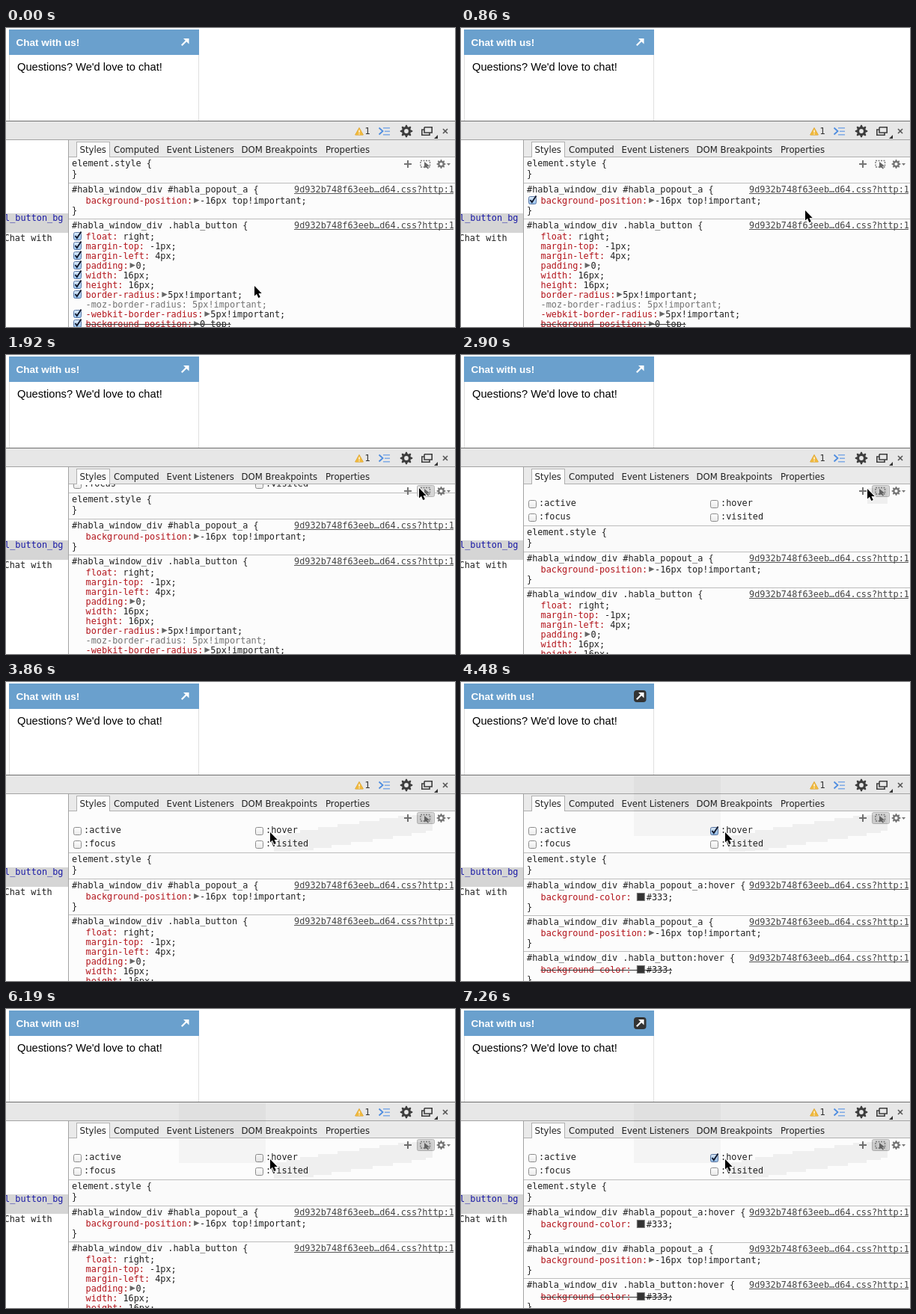
Recreate the animation shown at these times as an HTML page with a canvas. Size 600 by 400 pixels, loop 8 s.

```html
<!DOCTYPE html>
<html lang="en">
<head>
<meta charset="utf-8">
<title>Forcing the hover state</title>
<style>
html, body { margin: 0; width: 100%; height: 100%; overflow: hidden; background: #fff; }
canvas { display: block; width: 600px; height: 400px; }
</style>
</head>
<body>
<canvas id="stage" width="600" height="400"></canvas>
<script>
const ctx = document.getElementById('stage').getContext('2d');
const LOOP = 8000;
const MONO = '11.85px "DejaVu Sans Mono", Menlo, monospace';
const UI = '11.7px "DejaVu Sans", "Lucida Grande", sans-serif';
const SANS = '"Liberation Sans", Helvetica, Arial, sans-serif';
const INK = '#222', RED = '#b3151c', GREY = '#727272';
const FILE = '9d932b748f63eeb…d64.css?http:1';
const PANE_X = 84, PANE_Y = 173;

// Pointer moves: first step, last step, step count, target x, target y
const START = [332, 345];
const MOVES = [
  [500, 1220, 9, 533, 187],
  [1310, 1660, 5, 552, 178],
  [2900, 3690, 10, 358, 207],
  [3780, 3860, 2, 353, 201]
];

const ease = x => { x = x ** 0.89; return x * x * (3 - 2 * x); };

function stepsDone(t, [from, to, n]) {
  if (t < from) return 0;
  return Math.min(n, Math.floor((t - from + 1) / ((to - from) / (n - 1))) + 1);
}

function lerpMove(a, move, k) {
  const p = ease(k / move[2]);
  return [Math.round(a[0] + (move[3] - a[0]) * p), Math.round(a[1] + (move[4] - a[1]) * p)];
}

function pointerAt(t) {
  let pos = START;
  for (const m of MOVES) pos = lerpMove(pos, m, stepsDone(t, m));
  return pos;
}

function rect(x, y, w, h, color) {
  ctx.fillStyle = color;
  ctx.fillRect(x, y, w, h);
}

function text(str, x, y, color = INK, font = MONO, align = 'left') {
  ctx.font = font;
  ctx.textAlign = align;
  ctx.fillStyle = color;
  ctx.fillText(str, x, y);
  return ctx.measureText(str).width;
}

function shape(points, fill, stroke, width = 1, closed = true) {
  ctx.beginPath();
  points.forEach(([x, y]) => ctx.lineTo(x, y));
  if (closed) ctx.closePath();
  if (stroke) {
    ctx.strokeStyle = stroke;
    ctx.lineWidth = width;
    ctx.stroke();
  }
  if (fill) {
    ctx.fillStyle = fill;
    ctx.fill();
  }
}

const line = (points, color, width) => shape(points, null, color, width, false);

function box(x, y, w, h, r, fill, stroke) {
  ctx.beginPath();
  ctx.roundRect(x, y, w, h, r);
  ctx.fillStyle = fill;
  ctx.fill();
  if (stroke) {
    ctx.strokeStyle = stroke;
    ctx.lineWidth = 1;
    ctx.stroke();
  }
}

function gear(x, y, r, color, hole) {
  ctx.beginPath();
  for (let i = 0; i < 32; i++) {
    const a = (i - 0.5) * Math.PI / 16;
    const d = i % 4 < 2 ? r : r * 0.73;
    ctx.lineTo(x + Math.cos(a) * d, y + Math.sin(a) * d);
  }
  ctx.closePath();
  ctx.fillStyle = color;
  ctx.fill();
  ctx.beginPath();
  ctx.arc(x, y, r * 0.35, 0, 7);
  ctx.fillStyle = hole;
  ctx.fill();
}

function checkbox(x, y, on) {
  const g = ctx.createLinearGradient(0, y, 0, y + 11);
  g.addColorStop(0, on ? '#e3effb' : '#fff');
  g.addColorStop(1, on ? '#8fbdec' : '#e8e8e8');
  box(x + 0.5, y + 0.5, 10, 10, 2, g, on ? '#5b78a6' : '#8c8c8c');
  if (on) line([[x + 2.5, y + 5], [x + 4.8, y + 8], [x + 10.5, y - 0.5]], '#10182c', 1.9);
}

function drawPage(hover) {
  rect(0, 0, 600, 124, '#fff');
  rect(4, 36, 1, 88, '#e0e0e0');
  rect(257, 36, 1, 88, '#e0e0e0');
  rect(4, 2, 254, 34, '#6aa0cd');
  text('Chat with us!', 13.5, 24, '#fff', 'bold 13.5px ' + SANS);
  text("Questions? We'd love to chat!", 15, 57, '#000', '14.65px ' + SANS);
  if (hover) box(231, 11, 16.5, 16, 4, '#333');
  line([[234.8, 23.2], [242, 16]], '#fff', 2.2);
  shape([[237, 14], [244.5, 14], [244.5, 21.5]], '#fff');
}

function drawToolbar() {
  rect(0, 124, 600, 26, '#e7e7e7');
  rect(0, 124, 600, 1, '#6f6f6f');
  rect(0, 149, 600, 1, '#a3a3a3');

  shape([[472, 133.5], [477.3, 143], [466.7, 143]], '#f0b93c', '#d69a28');
  rect(471.4, 136.5, 1.3, 3.5, '#fff');
  rect(471.4, 141, 1.3, 1.3, '#fff');
  text('1', 479.5, 142, '#333', UI);

  line([[498.5, 133.5], [503.5, 138], [498.5, 142.5]], '#4e8de0', 1.8);
  rect(504, 133, 9, 1.5, '#7eaae6');
  rect(506, 137.5, 7, 1.5, '#7eaae6');
  rect(504, 142, 9, 1.5, '#7eaae6');

  gear(535, 138, 8.3, '#3d3d3d', '#e7e7e7');

  line([[559, 136], [555.8, 136], [555.8, 143.2], [566, 143.2], [566, 140]], '#3d3d3d', 1.6);
  line([[559, 132.8], [569.2, 132.8], [569.2, 140], [559, 140], [559, 132.8]], '#3d3d3d', 1.6);
  shape([[577, 143], [577, 148], [572, 148]], '#333');
  line([[584, 135], [590, 141]], '#555', 1.6);
  line([[590, 135], [584, 141]], '#555', 1.6);
}

function drawTabs() {
  rect(PANE_X, 150, 516, 23, '#eaeaea');
  rect(PANE_X, 172, 516, 1, '#b0b0b0');
  rect(94, 152, 45, 21, '#b0b0b0');
  rect(95, 153, 43, 20, '#fcfcfc');
  [['Styles', 98.5], ['Computed', 144], ['Event Listeners', 214.5],
   ['DOM Breakpoints', 314.5], ['Properties', 427]]
    .forEach(([name, x]) => text(name, x, 167, '#222', UI));
}

function drawTree() {
  rect(0, 150, 83, 250, '#fff');
  rect(0, 248, 83, 26, '#d5d5d5');
  text('l_button_bg', -2, 258, '#1a1aa6');
  text('Chat with', -2.5, 285);
  rect(83, 150, 1, 250, '#a3a3a3');
}

// One declaration; flags: a arrow, s swatch, x struck out, i ignored
function drawProp([name, value, flags = ''], y, checked) {
  const off = flags.includes('i');
  let x = 106.5;
  x += text(name + ':', x, y, off ? GREY : RED);
  if (flags.includes('a')) {
    shape([[x + 2, y - 8], [x + 9.3, y - 4.4], [x + 2, y - 0.8]], '#666');
    x += 10;
  } else {
    x += 7.1;
  }
  if (flags.includes('s')) {
    rect(x, y - 10, 11, 11, '#777');
    rect(x + 1, y - 9, 9, 9, '#333');
    x += 13;
  }
  x += text(value + ';', x, y, off ? GREY : INK);
  if (flags.includes('x')) rect(106.5, y - 4, x - 108, 1, '#333');
  if (checked && !off) checkbox(90, y - 10, true);
}

function drawRule(top, selector, props, checked) {
  const extra = (props[0][2] || '').includes('s') ? 1 : 0;
  rect(PANE_X, top, 516, 1, '#bdbdbd');
  text(selector + ' {', 88, top + 13);
  text(FILE, 599, top + 13, '#444', MONO, 'right');
  rect(385, top + 14, 213, 1, '#555');
  let y = top + 28 + extra;
  for (const p of props) {
    drawProp(p, y, checked);
    y += 13;
  }
  text('}', 88, y);
  return y + 7;
}

const HOVER = [['background-color', '#333', 's']];
const HOVER_STRUCK = [['background-color', '#333', 'sx']];
const POPOUT = [['background-position', '-16px top!important', 'a']];
const BUTTON = [
  ['float', 'right'],
  ['margin-top', '-1px'],
  ['margin-left', '4px'],
  ['padding', '0', 'a'],
  ['width', '16px'],
  ['height', '16px'],
  ['border-radius', '5px!important', 'a'],
  ['-moz-border-radius', '5px!important', 'i'],
  ['-webkit-border-radius', '5px!important', 'a'],
  ['background-position', '0 top', 'ax']
];

function drawStyles(shift, hover, rules, py) {
  ctx.save();
  ctx.beginPath();
  ctx.rect(PANE_X, PANE_Y, 516, 227);
  ctx.clip();
  rect(PANE_X, PANE_Y, 516, 227, '#fcfcfc');

  if (shift) {
    const dy = shift - 56;
    [['active', 90, 0], ['focus', 90, 18], ['hover', 333, 0], ['visited', 333, 18]]
      .forEach(([name, x, row]) => {
        checkbox(x, 194 + row + dy, name === 'hover' && hover);
        text(':' + name, x + 14, 202 + row + dy);
      });
    rect(PANE_X, 228 + dy, 516, 1, '#bdbdbd');
  }

  rect(PANE_X, PANE_Y + shift, 516, 34, '#fafafa');
  text('element.style {', 88, 185 + shift);
  text('}', 88, 199 + shift);

  let y = 207 + shift;
  if (rules) y = drawRule(y, '#habla_window_div #habla_popout_a:hover', HOVER);
  y = drawRule(y, '#habla_window_div #habla_popout_a', POPOUT, !shift && py > 207 && py < 255);
  if (rules) y = drawRule(y, '#habla_window_div .habla_button:hover', HOVER_STRUCK);
  drawRule(y, '#habla_window_div .habla_button', BUTTON, !shift && py >= 255);
  ctx.restore();
}

function drawPaneIcons(pressed) {
  rect(532, 181, 10, 2, '#757575');
  rect(536, 177, 2, 10, '#757575');

  if (pressed) box(549.5, 174.5, 23, 15, 2, '#d6d6d6', '#b4b4b4');
  ctx.setLineDash([2, 1.5]);
  ctx.strokeStyle = '#777';
  ctx.lineWidth = 1.4;
  ctx.strokeRect(554, 177.5, 12.5, 8.5);
  ctx.setLineDash([]);
  shape([[559, 179], [566, 184.5], [563, 185], [565, 188], [563.5, 188.5], [561.5, 186], [559, 187.5]], '#666');

  gear(581.5, 182, 6, '#757575', '#fcfcfc');
  shape([[589, 181], [594, 181], [591.5, 184]], '#757575');
}

// Faint smear left behind by the pointer
function drawTrail(t) {
  const from = [552, 178], move = MOVES[2], n = stepsDone(t, move);
  if (!n) return;
  ctx.beginPath();
  for (let k = 1; k <= n; k++) {
    const a = lerpMove(from, move, k - 1), b = lerpMove(from, move, k);
    ctx.rect(b[0], a[1], a[0] - b[0] + 18, b[1] - a[1] + 20);
  }
  ctx.fillStyle = 'rgba(0,0,0,.05)';
  ctx.fill();
}

function drawPointer([x, y]) {
  const outline = [[0, 0], [0, 13.5], [3, 10.8], [5.3, 16], [7.8, 15], [5.5, 9.9], [9.7, 9.9]];
  shape(outline.map(([dx, dy]) => [x + dx, y + dy]), '#000', '#fff', 1.8);
}

function draw(t) {
  const shift = t < 1920 ? 0 : t < 2010 ? 12 : 56;
  const hover = (t >= 4400 && t < 6100) || t >= 7170;
  const rules = (t >= 4480 && t < 6190) || t >= 7260;
  const pos = pointerAt(t);

  drawPage(hover);
  drawToolbar();
  drawTree();
  drawTabs();
  drawStyles(shift, hover, rules, pos[1]);
  drawPaneIcons(t >= 1660);
  drawTrail(t);
  if (t >= 4480) rect(231, 126, 116, 80, 'rgba(0,0,0,.03)');
  drawPointer(pos);
}

const begin = performance.now();
function tick() {
  draw((performance.now() - begin) % LOOP);
  requestAnimationFrame(tick);
}
tick();
</script>
</body>
</html>
```
